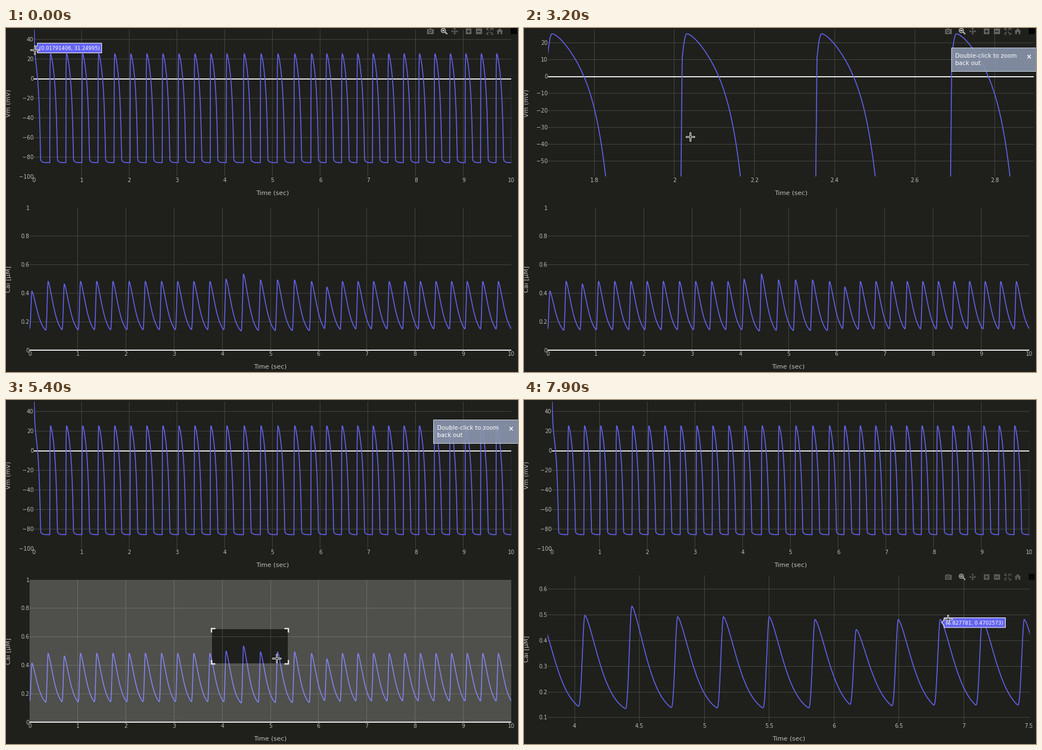
Animation of 912x614 px, one loop 8000 ms. Source, as a matplotlib script:

```python
import numpy as np
import matplotlib.pyplot as plt
from matplotlib.animation import FuncAnimation
from matplotlib.lines import Line2D
from matplotlib.patches import Circle, PathPatch, Polygon, Rectangle
from matplotlib.path import Path

W, H, DPI = 912, 614, 128
PX = 72 / DPI  # points per pixel
STEP, LOOP = 100, 8000
BG, GRID, INK, TRACE = "#1f201c", "#444541", "#bcbcb8", "#6464f2"
ICON, ACTIVE = "#636460", "#b4b4b0"

plt.rcParams["font.family"] = "DejaVu Sans"
plt.rcParams["toolbar"] = "None"
fig = plt.figure(figsize=(W / DPI, H / DPI), dpi=DPI, facecolor=BG)
ax = fig.add_axes([0, 0, 1, 1])
ax.set_xlim(0, W)
ax.set_ylim(H, 0)
ax.axis("off")


# ---------- signals ----------

# the rhythm slows down briefly after four seconds
GAPS = np.repeat([.3364, .335, .362, .353, .318, .3237], [8, 4, 1, 4, 1, 13])
ONSETS = np.cumsum(GAPS) - GAPS
ODD_PEAKS = {0: .415, 2: .465, 13: .535, 18: .444}


def action_potential(r):
    """Membrane voltage r seconds after a beat's onset."""
    rise = 14.4 * (np.maximum(.0125 - r, 0) / .0113) ** 2
    u = np.maximum(r - .0125, 0)
    fall = 1061 * u ** 1.5 + 5.6e6 * u ** 6
    rest = -85.9 + 2.6 * np.exp(-np.maximum(r - .158, 0) / .03)
    return np.maximum(25.4 - rise - fall, rest)


def voltage():
    ts, vs = [], []
    for i, (on, gap) in enumerate(zip(ONSETS, GAPS)):
        r = np.linspace(.0012 if i else 0, gap - .003, 100)
        ts.append(on + r)
        if i:
            vs.append(action_potential(r))
        else:
            vs.append(action_potential(r + .016) + 45 * np.exp(-r / .0112))
    return np.concatenate(ts), np.concatenate(vs)


def calcium(base=.125, top=.048, tail=.04):
    ts, vs, last = [], [], .15
    for i, (on, gap) in enumerate(zip(ONSETS, GAPS)):
        peak = ODD_PEAKS.get(i, .483 + .6 * max(gap - .335, 0))
        r = np.linspace(0, gap, 90, endpoint=False)
        s = np.clip(r / top, 0, 1) ** 1.2
        rise = last + (peak - last) * s * s * (3 - 2 * s)
        decay = np.exp(-(np.maximum(r - top, 0) / .155) ** 1.45)
        fall = base + (peak - base) * ((1 + tail) * decay - tail)
        v = np.where(r < top, rise, fall)
        ts.append(on + r)
        vs.append(v)
        last = v[-1]
    return np.concatenate(ts), np.concatenate(vs)


VM, CA = voltage(), calcium()


# ---------- drawing helpers ----------

def add(artist, group):
    ax.add_artist(artist)
    group.append(artist)
    return artist


def line(group, xs, ys, color, w=1.0, z=2, clip=None):
    ln = add(Line2D(xs, ys, color=color, lw=w * PX, zorder=z,
                    solid_capstyle="butt", solid_joinstyle="round"), group)
    if clip:
        l, t, r, b = clip
        ln.set_clip_path(Rectangle((l, t), r - l, b - t,
                                   transform=ax.transData))
    return ln


def rule(group, xs, ys, color, w=1.0, z=2):
    """Straight line kept exactly where it is put."""
    line(group, xs, ys, color, w, z).set_snap(False)


def rect(group, l, t, r, b, color, z=2, **kw):
    kw.setdefault("lw", 0)
    return add(Rectangle((l, t), r - l, b - t, fc=color, zorder=z, **kw), group)


def label(group, x, y, s, size, color=INK, ha="center", z=3, **kw):
    """Text whose digits are centred on y."""
    txt = ax.text(x, y + .365 * size, s, fontsize=size * PX, color=color,
                  ha=ha, va="baseline", zorder=z, **kw)
    group.append(txt)
    return txt


def fade(group, a):
    for art in group:
        art.set_visible(a > .005)
        art.set_alpha(a)


def ramp(t, start, length):
    return min(max((t - start) / length, 0), 1)


def ease(p):
    return 4 * p ** 3 if p < .5 else 1 - 4 * (1 - p) ** 3


# ---------- charts ----------

class Chart:
    def __init__(self, box, span, vrange, data, xticks, yticks, name, name_y):
        self.box, self.span, self.vrange, self.data = box, span, vrange, data
        self.art = g = []
        l, t, r, b = box
        for v in xticks:
            x, _ = self.px(v, 0)
            if l + 1 < x < r - 3:
                rule(g, [np.floor(x) + .5] * 2, [t, b], GRID)
            label(g, x, b + 6.7, f"{v:g}", 9.6)
        for v in yticks:
            _, y = self.px(0, v)
            if t + 1 < y < b - 1 and abs(v) > 1e-9:
                rule(g, [l, r], [np.floor(y) + .5] * 2, GRID)
            label(g, l - .4, y, f"{v:g}".replace("-", "\u2212"), 9.6, ha="right")
        if vrange[0] <= 0:
            rule(g, [l, r], [np.ceil(self.px(0, 0)[1])] * 2, "white", 1.8, 2.5)
        self.curve = self.px(*data)
        line(g, *self.curve, TRACE, 1.6, 4, box)
        label(g, (l + r) / 2, b + 28.3, "Time (sec)", 11.2)
        g.append(ax.text(5, name_y, name, fontsize=11.2 * PX, color=INK,
                         rotation=90, ha="center", va="center"))

    def px(self, t, v):
        l, top, r, b = self.box
        (t0, t1), (v0, v1) = self.span, self.vrange
        return (l + (t - t0) / (t1 - t0) * (r - l),
                b - (v - v0) / (v1 - v0) * (b - top))

    def show(self, on):
        for art in self.art:
            art.set_visible(on)

    def nearest(self, x, y, reach=14.5):
        l, t, r, b = self.box
        cx, cy = self.curve
        d = np.hypot(cx - x, cy - y)
        d[(cx < l) | (cx > r) | (cy < t) | (cy > b)] = np.inf
        i = d.argmin()
        return (self.data[0][i], self.data[1][i]) if d[i] < reach else None


VM_NAME, CA_NAME = "Vm (mV)", "Cai [\u00b5M]"
vm_full = Chart((49.7, 3, 900, 265), (0, 10), (-100, 50), VM,
                range(11), range(-100, 41, 20), VM_NAME, 134)
vm_zoom = Chart((43, 3, 908, 265), (1.685, 2.897), (-59.1, 27.75), VM,
                np.arange(1.8, 2.9, .2), range(-50, 21, 10), VM_NAME, 134)
ca_full = Chart((42, 321, 900, 575), (0, 10), (0, 1), CA,
                range(11), np.arange(0, 1.1, .2), CA_NAME, 448)
ca_zoom = Chart((42, 313, 901, 575), (3.792, 7.509), (.0825, .6545), CA,
                np.arange(4, 7.6, .5), np.arange(.1, .65, .1), CA_NAME, 444)


# ---------- toolbar ----------

def toolbar(y):
    g, z = [], 6

    def poly(pts, color=ICON):
        add(Polygon(pts, fc=color, lw=0, zorder=z), g)

    def disc(x, cy, r, color):
        add(Circle((x, cy), r, fc=color, lw=0, zorder=z), g)

    # camera
    rect(g, 749.5, y - 3.5, 761.5, y + 5, ICON, z)
    rect(g, 753, y - 5, 758, y - 3.5, ICON, z)
    disc(755.5, y + .7, 2.9, BG)
    disc(755.5, y + .7, 1.7, ICON)
    # magnifier
    line(g, [782, 786], [y + 1.5, y + 5.5], ACTIVE, 2.4, z)
    disc(779, y - 1, 4.6, ACTIVE)
    disc(779, y - 1, 3, BG)
    rect(g, 777.4, y - 2.6, 780.6, y + .6, ACTIVE, z)
    # move
    line(g, [794, 804], [y, y], ICON, 1.4, z)
    line(g, [799, 799], [y - 5, y + 5], ICON, 1.4, z)
    for dx, dy in ((1, 0), (-1, 0), (0, 1), (0, -1)):
        tip = np.array([799 + 6 * dx, y + 6 * dy])
        back, side = np.array([dx, dy]) * 2.5, np.array([dy, dx]) * 2.3
        poly([tip, tip - back + side, tip - back - side])
    # plus, minus
    for x in (823.7, 842.3):
        rect(g, x - 5.2, y - 5, x + 5.2, y + 5.4, ICON, z)
        line(g, [x - 3, x + 3], [y + .2] * 2, BG, 1.6, z)
    line(g, [823.7] * 2, [y - 2.8, y + 3.2], BG, 1.6, z)
    # autoscale
    for sx in (-1, 1):
        for sy in (-1, 1):
            cx, cy = 861 + 5.5 * sx, y + 5.5 * sy
            line(g, [861 + 1.3 * sx, cx - sx], [y + 1.3 * sy, cy - sy], ICON, 1.5, z)
            line(g, [cx - 3.5 * sx, cx, cx], [cy, cy, cy - 3.5 * sy], ICON, 1.2, z)
    # home
    poly([(873.5, y + .5), (879.5, y - 5), (885.5, y + .5)])
    rect(g, 875.3, y, 883.7, y + 5, ICON, z)
    rect(g, 878, y + 1.5, 881, y + 5, BG, z)
    rect(g, 898.5, y - 5.5, 909.5, y + 5.5, "#050505", z)
    return g


def shown(t, *spans):
    """Opacity of something that fades in and out of each time span."""
    return max(min(ramp(t, a, 300), 1 - ramp(t, b, 300)) for a, b in spans)


bar_top, bar_low = toolbar(5.5), toolbar(315.5)

# ---------- notice ----------

note_box = []
rect(note_box, 760.5, 34.5, 920, 76.5, "#8c97af", 7, ec="#dde3ee", lw=PX)
note_text = []
label(note_text, 768.5, 49.5, "Double-click to zoom", 10.4, "white", "left", 8)
label(note_text, 768.5, 62.7, "back out", 10.4, "white", "left", 8)
label(note_text, 899.5, 51.3, "\u00d7", 11.5, "white", z=8, weight="bold")


# ---------- pointer, hover, selection ----------

DRAG_VM, DRAG_CA = (193.5, 42), (367, 408.5)
# start and end time, place reached
MOVES = [(0, 400, (17, 110)), (600, 1000, (95, 178)), (1000, 1600, DRAG_VM),
         (1790, 2400, (296, 194)), (4100, 4900, DRAG_CA),
         (5200, 6200, (686, 554)), (6500, 7300, (755, 391))]


def mouse(t):
    pos = np.array([51.0, 39.0])
    for start, end, goal in MOVES:
        p = ramp(t, start, end - start)
        pos += (np.array(goal) - pos) * (1 - (1 - p) ** 2)
    return pos


live = []


def pointer(x, y):
    for color, w, n in (("white", 3, 8), ("black", 1, 7)):
        line(live, [x - n, x + n], [y, y], color, w, 12)
        line(live, [x, x], [y - n, y + n], color, w, 12)


def hover(chart, point):
    x, y = chart.px(*point)
    s = "({:.7g}, {:.7g})".format(*point)
    l, r, t, b = x + 4.7, x + 5.2 + 5.18 * len(s), y - 8.7, y + 8.7
    add(Polygon([(x, y), (l, y - 5), (l, t), (r, t), (r, b), (l, b), (l, y + 5)],
                fc=TRACE, ec="white", lw=PX, zorder=9), live)
    label(live, l + 3, y + .2, s, 8.9, "white", "left", 10)


def select(chart, start, end, a):
    l, t, r, b = chart.box
    (x0, y0), (x1, y1) = start, end
    thin = x1 - x0 < 20
    il, ir = (l, r) if thin else (x0, x1)
    ring = [(l, t), (r, t), (r, b), (l, b), (l, t)]
    hole = [(il, y0), (il, y1), (ir, y1), (ir, y0), (il, y0)]
    codes = ([Path.MOVETO] + [Path.LINETO] * 3 + [Path.CLOSEPOLY]) * 2
    add(PathPatch(Path(ring + hole, codes), fc="white", lw=0,
                  alpha=.3 * a * a, zorder=5), live)
    e, n = 1, 7
    x0, y0, x1, y1 = x0 - e, y0 - e, x1 + e, y1 + e
    if thin:
        marks = [([x0 - 16, x0 + 17], [y, y]) for y in (y0, y1)]
    else:
        marks = [([x + n * sx, x, x], [y, y, y + n * sy])
                 for x, sx in ((x0, 1), (x1, -1)) for y, sy in ((y0, 1), (y1, -1))]
    for xs, ys in marks:
        mark = line(live, xs, ys, "white", 2.4, 5.5)
        mark.set_solid_joinstyle("miter")
        mark.set_alpha(a)


def hovered(t, x, y):
    if t < 100:
        return vm_full, (0.01791406, 31.24995)
    if t >= 7300:
        return ca_zoom, (6.827781, 0.4702573)
    if 600 <= t <= 1600 or 4200 <= t < 4800:
        return vm_full, vm_full.nearest(x, y)
    if t >= 6600:
        return ca_zoom, ca_zoom.nearest(x, y)
    return None, None


def update(i):
    t = i * STEP
    while live:
        live.pop().remove()

    vm_in, ca_in = 2700 <= t < 4100, t >= 6500
    vm_full.show(not vm_in)
    vm_zoom.show(vm_in)
    ca_full.show(not ca_in)
    ca_zoom.show(ca_in)

    fade(bar_top, shown(t, (-300, 1600), (2650, 3550), (4050, 4700)))
    fade(bar_low, shown(t, (4600, 5050), (6450, 7850)))
    a = ease(ramp(t, 2600, 700)) * (1 - ease(ramp(t, 5700, 500)))
    fade(note_box, .9 * a)
    fade(note_text, a)

    x, y = mouse(t)
    chart, point = hovered(t, x, y)
    if point:
        hover(chart, point)
    if 1800 <= t < 2700:
        select(vm_full, DRAG_VM, mouse(t + 40), ramp(t, 1770, 200))
    if 5300 <= t < 6500:
        select(ca_full, DRAG_CA, mouse(t + 40), ramp(t, 5230, 200))
    pointer(x, y)
    return live


anim = FuncAnimation(fig, update, frames=LOOP // STEP, interval=STEP,
                     repeat=True, repeat_delay=0, blit=False)
plt.show()
```
